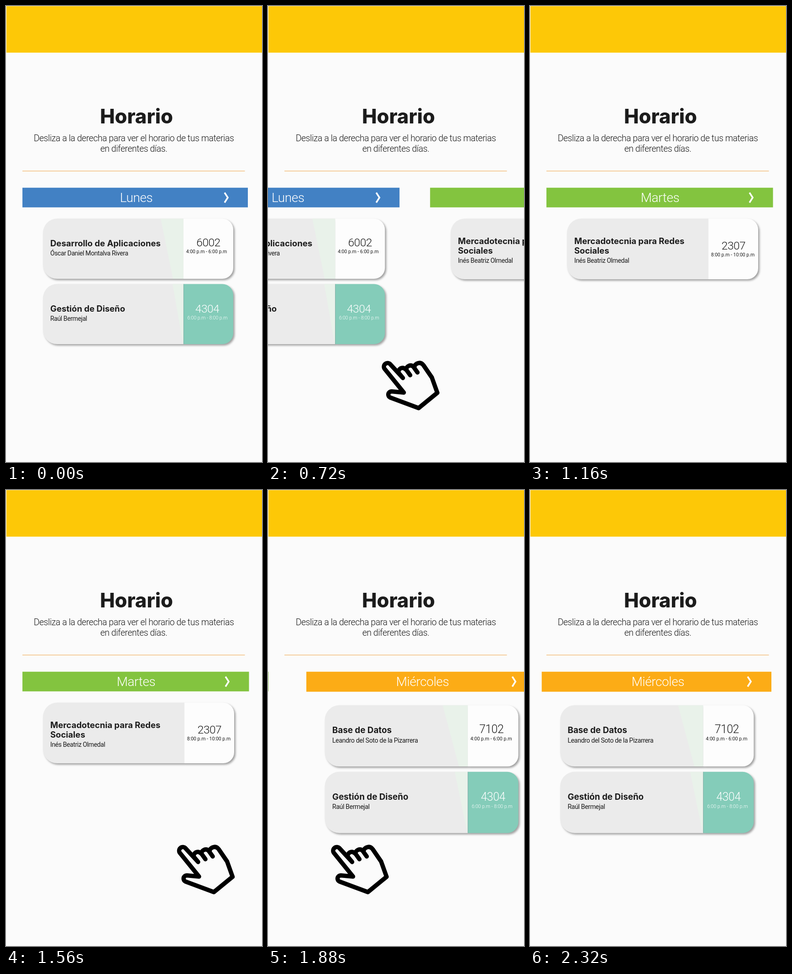
Animation of 561x998 px, one loop 3000 ms. Source, as an HTML page:

```html
<!DOCTYPE html>
<html lang="es">
<head>
<meta charset="utf-8">
<title>Horario</title>
<style>
html, body { margin: 0; width: 100%; height: 100%; overflow: hidden; background: #fbfbfb; }
svg { display: block; }
text { font-family: Roboto, "Liberation Sans", sans-serif; font-weight: 300; fill: #1c1c1c; }
.mid { text-anchor: middle; }
.head, .title { font-family: Inter, "Liberation Sans", sans-serif; font-weight: 700; font-optical-sizing: none; }
.head { font-size: 43.5px; font-weight: 800; }
.title { font-size: 18.5px; }
.intro { font-size: 19.5px; letter-spacing: -.46px; }
.day { font-size: 28px; letter-spacing: -.4px; fill: #fff; }
.teacher { font-size: 14px; font-weight: 400; letter-spacing: -.4px; }
.room { font-size: 24.5px; letter-spacing: -.5px; }
.time { font-size: 10.5px; font-weight: 400; }
.teal text.mid { fill: #fff; }
.teal .time { font-weight: 300; }
.box { filter: drop-shadow(3px 3px 2px rgba(0, 0, 0, .36)); }
</style>
</head>
<body>
<svg width="561" height="998" viewBox="0 0 561 998">
  <rect width="561" height="998" fill="#fbfbfb"/>
  <rect x="1" y=".4" width="560" height="101.700" fill="#fdc807"/>
  <text class="head mid" x="286" y="257">Horario</text>
  <text class="intro mid" x="280" y="295.5">Desliza a la derecha para ver el horario de tus materias</text>
  <text class="intro mid" x="280" y="318.5">en diferentes días.</text>
  <path d="M36 361.200H523.500" stroke="#f4c080" stroke-width="1.4"/>
  <g id="days"></g>
  <g id="hand" fill="none" stroke="#000" stroke-width="9.5" stroke-linecap="round" stroke-linejoin="round">
    <path d="M421 814L393.500 784.200A8 8 0 0 0 381.500 794.800L423 846L396 843.500A7 7 0 0 0 393.500 857L455.500 880L496.500 846.500L484.500 813L466 786Q460 778 451 783Q446 786 446 791Q440 784 433 788Q428 791 428 796Q422 790 416 793Q411 796 411 802Z"/>
    <path d="M427 794L437 808M443 788L453 802"/>
  </g>
</svg>
<script>
const $ = id => document.getElementById(id);
const label = (cls, x, y, str) => `<text class="${cls}" x="${x}" y="${y}">${str}</text>`;

// A card is drawn from its top edge; split is where the room panel starts.
function card({ y, right = 498, split = 389, h = 131.5, lines, base = 60, teacher, room, roomX, time, timeX, drop = 0, teal, wedge }) {
  const tint = wedge
    ? `<path fill="#e9f2ea" d="M${wedge[0]} ${y}H${split}V${y + h}H${wedge[1]}Z"/>` : '';
  const edge = teal
    ? `<path stroke="#64888a" stroke-width=".5" d="M${split + 0.25} ${y}v${h}"/>` : '';
  const last = base + 21 * (lines.length - 1);
  return `<g class="${teal ? 'teal' : ''}">
    <g class="box">
      <path fill="#ebebeb" d="M${split} ${y}H112a31 31 0 0 0 -31 31v${h - 62}a31 31 0 0 0 31 31H${split}z"/>
      <path fill="${teal ? '#84ccb9' : '#fdfdfd'}" d="M${split} ${y}H${right - 24}a24 24 0 0 1 24 24v${h - 48}a24 24 0 0 1 -24 24H${split}z"/>
    </g>${tint}${edge}
    ${lines.map((s, i) => label('title', 97, y + base + 21 * i, s)).join('')}
    ${label('teacher', 97, y + last + 20, teacher)}
    ${label('room mid', roomX, y + 60 + drop, room)}
    ${label('time mid', timeX, y + 75 + drop, time)}
  </g>`;
}

function day(name, nameX, color, left, right, height, arrow, cards, place = '') {
  return `<g>
    <rect x="${left}" y="397.7" width="${right - left}" height="${height}" fill="${color}"/>
    ${label('day mid', nameX, 428.8, name)}
    <path fill="none" stroke="#fff" stroke-width="3.6" d="M${arrow} 408.500l7 10.800l-7 10.900"/>
    <g transform="${place}">${cards.map(card).join('')}</g>
  </g>`;
}

const design = {
  y: 608.5, lines: ['Gestión de Diseño'], teacher: 'Raúl Bermejal',
  room: '4304', roomX: 441, time: '6:00 p.m - 8:00 p.m', timeX: 441.5, drop: 2.5, teal: true, wedge: [365, 388]
};
const early = { y: 465.5, time: '4:00 p.m - 6:00 p.m', timeX: 439.5 };

$('days').innerHTML =
  day('Lunes', 285.5, '#4281c4', 36, 530, 43, 479, [
    { ...early, lines: ['Desarrollo de Aplicaciones'], teacher: 'Óscar Daniel Montalva Rivera', room: '6002', roomX: 443.5, wedge: [339, 366] },
    design
  ]) +
  day('Martes', 285, '#83c43f', 36, 532.5, 43, 481, [{
    y: 465.5, h: 132.5, right: 500, split: 391, lines: ['Mercadotecnia para Redes', 'Sociales'], base: 55.5,
    teacher: 'Inés Beatriz Olmedal', room: '2307', roomX: 446, time: '8:00 p.m - 10:00 p.m', timeX: 444.5, drop: 7.5
  }]) +
  day('Miércoles', 280.3, '#fcac16', 25.7, 529, 43.8, 477, [
    { ...early, lines: ['Base de Datos'], teacher: 'Leandro del Soto de la Pizarrera', room: '7102', roomX: 440, wedge: [335, 370] },
    { ...design, roomX: 443.5, wedge: [361, 388] }
  ], 'translate(66.2 471.2) scale(1.017 1.018) translate(-81 -465.5)');

// Cubic Bézier (0, 0, .58, 1)
function easeOut(x) {
  if (x <= 0) return 0;
  if (x >= 1) return 1;
  let lo = 0, hi = 1;
  for (let i = 0; i < 24; i++) {
    const s = (lo + hi) / 2;
    if (1.74 * (1 - s) * s * s + s ** 3 < x) lo = s; else hi = s;
  }
  return lo * lo * (3 - 2 * lo);
}

const LOOP = 3000, STEP = 40, SLIDE = 382, FIRST = 561, SECOND = 590, SWIPE = 291;
const [monday, tuesday, wednesday] = $('days').children;
const hand = $('hand');
const move = (el, x) => el.setAttribute('transform', `translate(${x.toFixed(2)} 0)`);

function draw() {
  const t = Math.floor(performance.now() % LOOP / STEP) * STEP;
  const slide = start => easeOut((t - start) / SLIDE);
  const a = slide(609.5), b = slide(1596.5);
  move(monday, -FIRST * a);
  move(tuesday, FIRST * (1 - a) - SECOND * b);
  move(wednesday, FIRST * (1 - a) + SECOND * (1 - b));
  move(hand, -SWIPE * (t < 1560 ? a : slide(1639)));
  const shown = t >= 520 && t < 1160 || t >= 1560 && t < 2320;
  hand.style.display = shown ? '' : 'none';
  requestAnimationFrame(draw);
}
draw();
</script>
</body>
</html>
```
